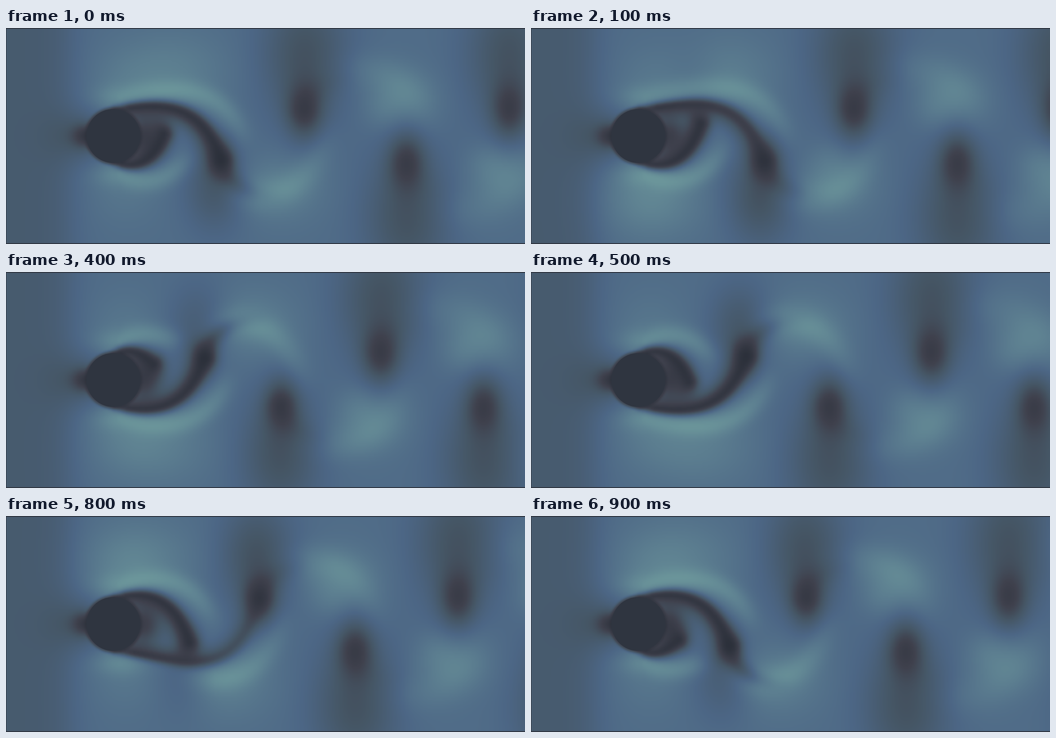
Animation of 1155 by 480 pixels, one loop 1000 ms. Source, as an HTML page with a canvas:

```html
<!DOCTYPE html>
<html lang="en">
<head>
<meta charset="utf-8">
<title>Flow past a cylinder</title>
<style>
html, body { margin: 0; width: 100%; height: 100%; overflow: hidden; background: #2f3540; }
canvas { display: block; }
</style>
</head>
<body>
<canvas id="stage" width="1155" height="480"></canvas>
<script>
const W = 1155, H = 480, CELL = 3, COLS = W / CELL, ROWS = H / CELL;
const CX = 239, CY = 240, R = 60, SOLID = '#2f3540';
const STARTS = [0, 100, 300, 400, 500, 600, 800, 900];

// Speed, then red, green, blue
const RAMP = [[0, 41, 46, 56], [.25, 63, 65, 77], [.41, 69, 86, 101], [.62, 76, 102, 133], [1, 107, 149, 154]];

const clamp = (v, lo = 0, hi = 1) => Math.min(hi, Math.max(lo, v));
let speed, mask, upper;

// Soft elliptical spot, kept in the mask where it is strongest
function dab(x, y, sx, sy, a) {
  if (upper) y = H - y;
  const range = (c, s, n) => [
    clamp(Math.floor((c - 2.6 * s) / CELL), 0, n), clamp(Math.ceil((c + 2.6 * s) / CELL), 0, n)
  ];
  const [x0, x1] = range(x, sx, COLS), [y0, y1] = range(y, sy, ROWS);
  for (let j = y0; j < y1; j++) {
    const dy = ((j + .5) * CELL - y) / sy;
    for (let i = x0; i < x1; i++) {
      const dx = ((i + .5) * CELL - x) / sx, k = j * COLS + i;
      mask[k] = Math.max(mask[k], a * Math.exp(-dx * dx - dy * dy));
    }
  }
}

function brighten() {
  speed.forEach((v, k) => { speed[k] = v + mask[k]; });
  mask.fill(0);
}
function darken() {
  speed.forEach((v, k) => { speed[k] = v * (1 - mask[k]); });
  mask.fill(0);
}
const glow = (...spot) => { dab(...spot); brighten(); };
const shade = (...spot) => { dab(...spot); darken(); };

const bezier = (p, t) => [0, 1].map(c => {
  const u = 1 - t;
  return u * u * u * p[0][c] + 3 * u * u * t * p[1][c] + 3 * u * t * t * p[2][c] + t * t * t * p[3][c];
});

// Row of round dabs along a curve; style(t) gives [strength, width, dx, dy]
function trail(curve, style) {
  for (let t = 0; t <= 1; t += .01) {
    const [x, y] = bezier(curve, t), [a, w, dx = 0, dy = 0] = style(t);
    dab(x + dx, y + dy, w, w, a);
  }
}

// A vortex's place by age in steps; described for the lower row
const driftX = age => age < 6 ? 480 + 39 * age + 1.75 * age * age : 777 + 57.2 * (age - 6);
const driftY = age => 300 - 7 * 1.7 ** -age;

// Shear layer from the cylinder's shoulder to its vortex
function layer(age) {
  const x = driftX(age), dx = x - 245;
  return [[245, 180], [245 + .45 * dx, 160], [245 + .82 * dx, 190 - 25 * 1.95 ** age], [x, driftY(age)]];
}

// Fast stream along the outer side of the layer, carried on after it breaks off
function stream(age) {
  const joined = Math.min(age, 2), old = Math.max(age, 0);
  const shift = driftX(age) - driftX(joined), a = Math.max(.08, .2 - .013 * old);
  trail(layer(joined), t => [
    a * (1 - .8 * t ** 8) * (age > 1 ? clamp((t - .3) * 5) : 1),
    25 + 2 * old, 10 + 40 * t + shift, -25 - 25 * t - 4 * Math.max(0, age - 2)
  ]);
}

function crest(age) {
  const k = clamp(age, 0, 8), x = driftX(age);
  glow(x - 110 + 12.5 * k, 95 + 7 * k, 118 - 5 * k, 85 - 3 * k, .14);
  glow(x - 50, 185, 45, 45, .06 * clamp(age - 4));
}

function core(age) {
  const x = driftX(age), y = driftY(age), k = clamp(age, 0, 4), grown = clamp(age + 4, 0, 8);
  shade(x - 15 + 4 * k, 360 + 15 * k, 65 + 7.5 * k, 90 + 15 * k, .43 * clamp((age + 4) / 5));
  shade(x, y, 22 + 2.2 * grown, 30 + 4 * grown, .62 * clamp(grown / 6));
  if (age < -1) return;
  const a = .55 * .78 ** (age + 1);
  trail([[x, y], [x + 10, 345], [x + 60, 374], [x + 140, 378]], t => [a * (1 - t), 20 + 2 * (age + 1)]);
  darken();
}

function shearLayer(age) {
  const curve = layer(age), fade = .33 * Math.max(0, age);
  trail(curve, t => [.36 * (1 - fade * t), 14 + 16 * t, -8 * t, 18]);
  darken();
  trail(curve, t => [.78 * (1 - fade * t) * clamp(.7 + 3 * t), 11 + 9 * t, 0, 3]);
  darken();
}

function colourAt(v) {
  const n = Math.max(1, RAMP.findIndex(s => s[0] >= v)), a = RAMP[n - 1], b = RAMP[n];
  const f = (v - a[0]) / (b[0] - a[0]);
  return [1, 2, 3].map(c => a[c] + (b[c] - a[c]) * f);
}

function build(step) {
  speed = new Float32Array(COLS * ROWS);
  mask = new Float32Array(COLS * ROWS);
  const centre = k => [(k % COLS + .5) * CELL, (Math.floor(k / COLS) + .5) * CELL];
  speed.forEach((_, k) => { speed[k] = .47 + .2 / (1 + Math.exp((140 - centre(k)[0]) / 22)); });

  // Rows alternate, four steps apart
  const each = (from, to, part) => {
    for (let n = 0; n < 6; n++) {
      const age = step - 7 + 4 * n;
      upper = n % 2 === 0;
      if (age >= from && age <= to) part(age);
    }
  };
  for (upper of [false, true]) dab(258, 155, 60, 28, .18);
  each(-5, 17, stream);
  brighten();
  for (upper of [false, true]) glow(265, 120, 80, 75, .07);
  each(-3, 17, crest);
  each(-3, 17, core);
  each(-5, 2, shearLayer);
  upper = false;
  shade(305, CY, 45, 54, .68);
  shade(160, CY, 68, 58, .28);
  shade(178, CY, 30, 25, .72);

  const img = new ImageData(COLS, ROWS);
  speed.forEach((v, k) => {
    const [x, y] = centre(k), gap = (Math.hypot(x - CX, y - CY) - R) / 5;
    img.data.set([...colourAt(clamp(v * (1 - .55 * Math.exp(-gap * gap)))), 255], 4 * k);
  });
  const field = document.createElement('canvas');
  field.width = COLS;
  field.height = ROWS;
  field.getContext('2d').putImageData(img, 0, 0);
  return field;
}

const fields = [0, 1, 2, 3].map(build);
const ctx = document.getElementById('stage').getContext('2d');
ctx.imageSmoothingQuality = 'high';

function draw() {
  const t = performance.now() % 1000;
  const phase = STARTS.filter(s => s <= t).length - 1;
  ctx.save();
  // The second half cycle is the first one upside down
  if (phase >= 1 && phase <= 4) ctx.transform(1, 0, 0, -1, 0, H);
  ctx.drawImage(fields[(phase + 3) % 4], 0, 0, W, H);
  ctx.restore();
  ctx.fillStyle = SOLID;
  ctx.beginPath();
  ctx.arc(CX, CY, R, 0, 2 * Math.PI);
  ctx.fill();
  ctx.fillRect(0, 0, W, 2);
  ctx.fillRect(0, H - 2, W, 2);
  ctx.fillRect(0, 0, 1, H);
  requestAnimationFrame(draw);
}
draw();
</script>
</body>
</html>
```
